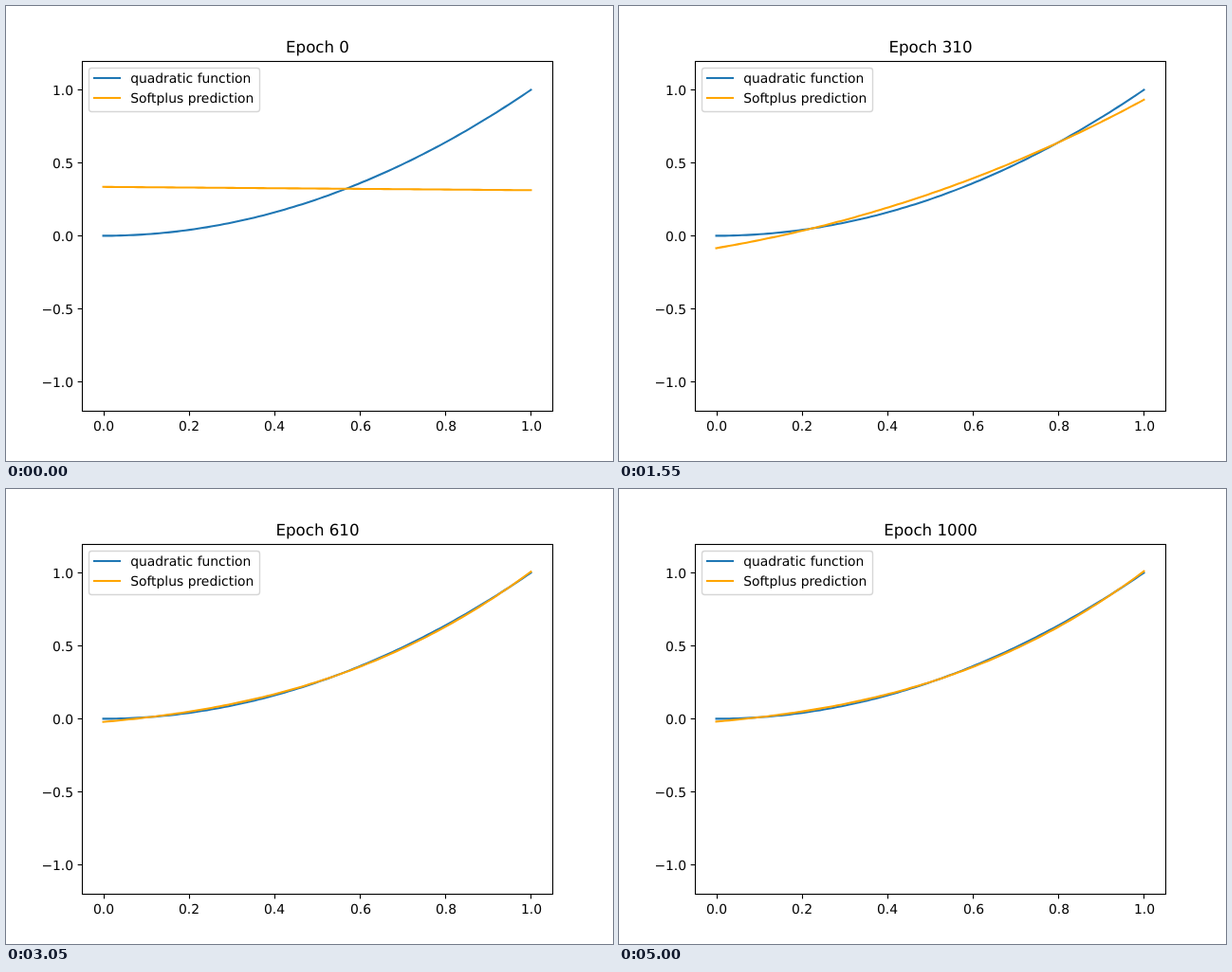
An HTML page that plays this animation: 640x480 px, repeating every 5.05 s.

```html
<!DOCTYPE html>
<html lang="en">
<head>
<meta charset="utf-8">
<title>Softplus fit</title>
<style>
  html, body { margin: 0; width: 100%; height: 100%; overflow: hidden; background: #fff; }
  svg { display: block; width: 640px; height: 480px; }
  text { font: 13.889px "DejaVu Sans", sans-serif; fill: #000; text-rendering: geometricPrecision; }
  #title { font-size: 16.667px; text-anchor: middle; }
  .axis { fill: none; stroke: #000; stroke-width: 1.11; }
  .curve { fill: none; stroke-width: 2.083; stroke-linecap: square; stroke-linejoin: round; }
  .blue { stroke: #1f77b4; }
  .orange { stroke: #ffa500; }
  .end { text-anchor: end; }
</style>
</head>
<body>
<svg viewBox="0 0 640 480">
  <rect width="640" height="480" fill="#fff"/>
  <g id="ticks"></g>
  <path id="quad" class="curve blue"/>
  <path id="pred" class="curve orange"/>
  <rect class="axis" x="80.5" y="58.5" width="496" height="369"/>
  <text id="title" x="328.5" y="49"></text>
  <rect x="87.5" y="65.5" width="180" height="46" rx="2.78" fill="#fff" fill-opacity=".8"
        stroke="#ccc" stroke-opacity=".8" stroke-width="1.389"/>
  <path class="curve blue" d="M93 76H120"/>
  <path class="curve orange" d="M93 97H120"/>
  <text x="131.2" y="81">quadratic function</text>
  <text x="131.2" y="102">Softplus prediction</text>
</svg>
<script>
const STEP_MS = 50, STEPS = 101, EPOCHS_PER_STEP = 10;
const $ = id => document.getElementById(id);
const px = x => 102.545 + 450.909 * x;
const py = y => 242.4 - 154 * y;

function plot(fn, n = 99) {
  let d = "";
  for (let i = 0; i <= n; i++) {
    const x = i / n;
    d += (i ? "L" : "M") + px(x).toFixed(2) + " " + py(fn(x)).toFixed(2);
  }
  return d;
}

// A damped swing finds the straight fit, then a slow sigmoid bends it into the parabola
function prediction(epoch) {
  const swing = Math.exp(-epoch / 25) * Math.cos(Math.PI * epoch / 48);
  const learned = 1 / (1 + Math.exp((315 - epoch) / 75));
  const y0 = -.146 + .127 * learned + .479 * swing;
  const y1 = .858 + .153 * learned - .548 * swing;
  const bend = (.13 + .86 * learned) * (1 - swing);
  const skew = .4 * learned ** 3;
  return x => y0 + (y1 - y0) * x + x * (x - 1) * (bend + skew * (x - .53));
}

function drawAxes() {
  let out = "";
  for (let i = 0; i <= 5; i++) {
    const x = px(i / 5);
    out += `<path class="axis" d="M${Math.round(x) + .5} 427.5v4.86"/>`
      + `<text x="${Math.round(x - 10.5)}" y="448">${(i / 5).toFixed(1)}</text>`;
  }
  for (let i = -2; i <= 2; i++) {
    const y = Math.round(py(i / 2));
    out += `<path class="axis" d="M80.5 ${y + .5}h-4.86"/>`
      + `<text class="end" x="71.1" y="${y + 6}">${(i / 2).toFixed(1).replace("-", "\u2212")}</text>`;
  }
  $("ticks").innerHTML = out;
  $("quad").setAttribute("d", plot(x => x * x));
}

let shown = -1;
function render(ms) {
  const step = Math.floor(ms / STEP_MS) % STEPS;
  if (step === shown) return;
  shown = step;
  const epoch = step * EPOCHS_PER_STEP;
  $("title").textContent = "Epoch " + epoch;
  $("pred").setAttribute("d", plot(prediction(epoch)));
}

drawAxes();
render(0);
const start = performance.now();
(function tick() {
  render(performance.now() - start);
  requestAnimationFrame(tick);
})();
</script>
</body>
</html>
```
